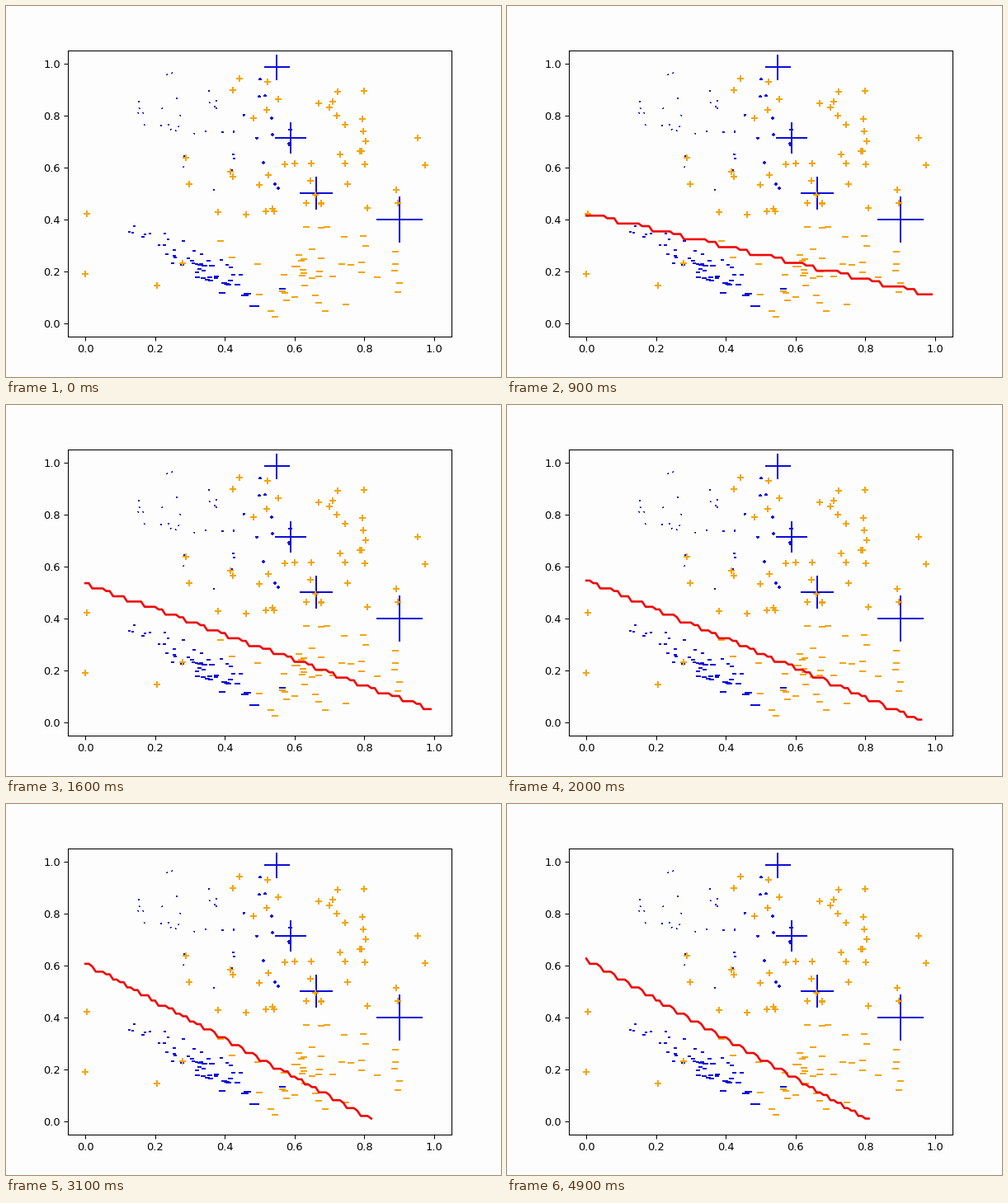
Animation of 600 by 450 pixels, one loop 5 s. Source, as a matplotlib script:

```python
import numpy as np
import matplotlib.pyplot as plt
from matplotlib.animation import FuncAnimation

FRAMES, INTERVAL, DPI = 50, 100, 93.75
PAPER, BLUE, ORANGE, RED = "#fefdfe", "#0808d8", "#f2a30c", "#ee0808"

# Key poses of the boundary: frame, intercept and fall per column (grid units)
POSES = np.array([
    (1, 17, .05), (6, 32.96, .2165), (12, 52.5, .413), (20, 55.1, .56),
    (25, 58, .645), (30, 60.9, .72), (38, 62.95, .764), (49, 62.7, .761),
])
# Rows of the grid the boundary never rests on
SKIPPED = [*range(3, 46, 3), 47, *range(49, 100, 3)]

rng = np.random.default_rng(7)
fig = plt.figure(figsize=(6.4, 4.8), dpi=DPI, facecolor=PAPER)
ax = fig.add_subplot(facecolor=PAPER)
ax.set(xlim=(-.05, 1.05), ylim=(-.05, 1.05))


def scatter(x, y, extent, marker, color):
    """Draw markers whose extent is given in stage pixels."""
    size = (np.asarray(extent) * 72 / DPI) ** 2
    ax.scatter(x, y, s=size, marker=marker, color=color)


def add_blue_class():
    # Tiny pluses that grow to the right, falling gently
    x = rng.uniform(.15, .59, 42)
    y = np.clip(.84 - .4 * (x - .15) + rng.normal(0, .12, 42), .38, 1)
    scatter(x, y, np.clip(1.2 + 13.7 * (x - .33), 1.3, 4.5), "+", BLUE)

    # Dashes along a descending band, wider towards the bottom
    x = np.clip(rng.normal(.34, .1, 55), .1, .63)
    y = np.clip(.46 - .7 * x + rng.normal(0, .04, 55), 0, .44)
    scatter(x, y, 3 + 14 * (1 - y / .43).clip(0) ** 3, "_", BLUE)

    # Heavily weighted samples
    for x, y, extent in [(.548, .987, 31), (.589, .712, 38),
                         (.663, .501, 40), (.9, .4, 56)]:
        scatter(x, y, extent, "+", BLUE)


def add_orange_class():
    x = np.clip(rng.normal(.67, .15, 44), .38, 1)
    scatter(x, rng.uniform(.38, 1, 44), 8.33, "+", ORANGE)
    outliers = [(0, .19), (.005, .42), (.205, .145),
                (.278, .23), (.288, .638), (.298, .535)]
    scatter(*np.transpose(outliers), 8.33, "+", ORANGE)

    x = np.clip(rng.normal(.66, .15, 46), .36, .97)
    y = np.clip(rng.normal(.2, .09, 46), 0, .37)
    scatter(x, y, 8.33, "_", ORANGE)


add_blue_class()
add_orange_class()
boundary, = ax.plot([], [], color=RED, lw=2, zorder=3)


def draw(frame):
    if frame == 0:
        boundary.set_data([], [])
        return boundary,
    key, intercepts, falls = POSES.T
    column = np.arange(100)
    value = (np.interp(frame, key, intercepts)
             - np.interp(frame, key, falls) * column)
    row = np.floor(value).astype(int)
    row -= np.isin(row, SKIPPED)
    inside = value >= 1
    boundary.set_data(column[inside] / 100, row[inside] / 99)
    return boundary,


animation = FuncAnimation(fig, draw, frames=FRAMES, interval=INTERVAL,
                          init_func=lambda: draw(0), repeat=True,
                          repeat_delay=0)
plt.show()
```
